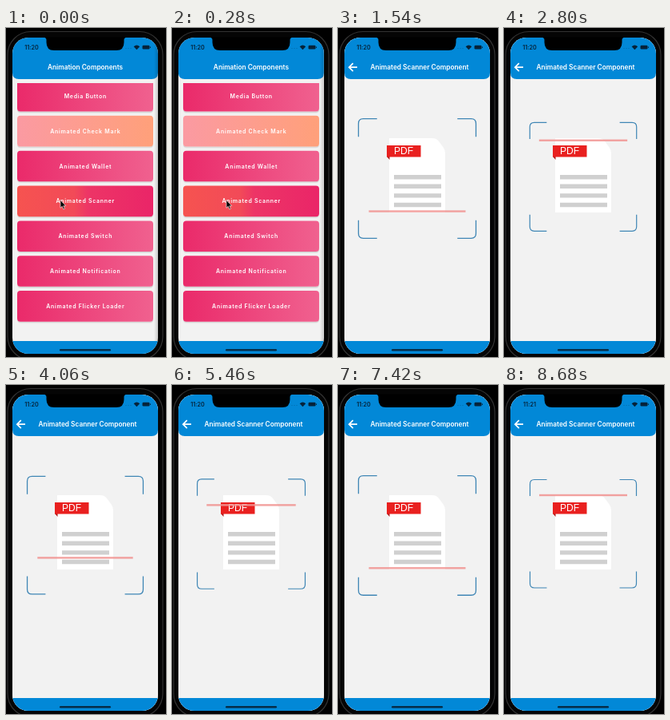
Animation of 200 by 412 pixels, one loop 8820 ms. Source, as an HTML page:

```html
<!DOCTYPE html>
<html lang="en">
<head>
<meta charset="utf-8">
<title>Animated Scanner Component</title>
<style>
  @property --scan { syntax: "<number>"; inherits: true; initial-value: 0; }
  @property --push { syntax: "<number>"; inherits: true; initial-value: 0; }

  html, body { margin: 0; width: 100%; height: 100%; overflow: hidden; background: #000; }

  #stage {
    --t: 0;
    display: block; width: 100%; height: 100%;
    font-family: Inter, "Liberation Sans", sans-serif; font-weight: 600;
    animation: scan 8820ms cubic-bezier(.455, .03, .515, .955) infinite paused,
               push 8820ms infinite paused,
               pointer 8820ms step-end infinite paused;
    animation-delay: calc(var(--t) * -1ms);
  }

  @keyframes scan {
    0%, 6.35% { --scan: 0; }
    17.86% { --scan: 1; }
    33.56% { --scan: 0; }
    50.79% { --scan: 1; }
    65.87% { --scan: 0; }
    83.33% { --scan: 1; }
    98.41%, 100% { --scan: 0; }
  }
  @keyframes push {
    0%, 3.17% { --push: 0; animation-timing-function: cubic-bezier(.3, .25, .7, .8); }
    6.35% { --push: .764; animation-timing-function: ease-out; }
    11.11%, 100% { --push: 1; }
  }
  @keyframes pointer {
    0% { --pointer: 1; }
    12.7%, 100% { --pointer: 0; }
  }

  .list { transform: translateX(calc(var(--push) * -54.6px)); }
  .page { transform: translateX(calc((1 - var(--push)) * 182px)); }
  .card { opacity: calc(1 - var(--push) * .26); }
  .tint { opacity: var(--push); }
  .dim { opacity: calc(var(--push) * .08); }
  .edge { opacity: calc((1 - var(--push)) * .5); }
  .cursor { opacity: var(--pointer); }
  .corners {
    transform-origin: 99px 186px;
    transform: translateY(calc(var(--scan) * 2.2px)) scale(calc(1 + var(--scan) * .105));
  }
  .beam {
    transform-origin: 99px 138px;
    transform: translateY(calc(var(--scan) * 92px)) scaleX(calc(1 + var(--scan) * .1));
  }
  .title { font-size: 8.3px; fill: #fff; text-anchor: middle; }
  .label { font-size: 7px; letter-spacing: .7px; fill: #fff; text-anchor: middle; }
</style>
</head>
<body>
<svg id="stage" viewBox="0 0 200 412">
  <defs>
    <clipPath id="screen"><rect x="8" y="12" width="182" height="396" rx="20"/></clipPath>
    <clipPath id="scroll"><rect x="8" y="69" width="182" height="323"/></clipPath>
    <linearGradient id="pink"><stop stop-color="#ea2a6a"/><stop offset="1" stop-color="#f0618f"/></linearGradient>
    <linearGradient id="peach"><stop stop-color="#fb9aa2"/><stop offset="1" stop-color="#ffa07a"/></linearGradient>
    <linearGradient id="pressed"><stop stop-color="#f65350"/><stop offset=".42" stop-color="#f24a58"/><stop offset=".52" stop-color="#ed3566"/><stop offset="1" stop-color="#ea2568"/></linearGradient>
    <linearGradient id="shade"><stop stop-color="#000" stop-opacity="0"/><stop offset="1" stop-color="#000" stop-opacity=".35"/></linearGradient>
    <path id="header" d="M8 10H190V56Q190 64 182 64H16Q8 64 8 56Z" fill="#0288d7"/>
    <path id="corner" d="M32.5 139V124Q32.5 118.5 38 118.5H53.5"/>
  </defs>

  <rect width="200" height="412" fill="#000"/>
  <rect x="2" y="4.5" width="194" height="411" rx="29" fill="#050505" stroke="#333" stroke-width="1.2"/>

  <g clip-path="url(#screen)">
    <rect x="8" y="10" width="182" height="400" fill="#f2f2f2"/>

    <g class="list">
      <use href="#header"/>
      <text class="title" x="99" y="52">Animation Components</text>
      <g clip-path="url(#scroll)" id="cards"></g>
    </g>
    <rect class="dim" x="8" y="10" width="182" height="400"/>

    <g class="page">
      <rect class="edge" x="3" y="10" width="5" height="400" fill="url(#shade)"/>
      <rect x="8" y="10" width="182" height="400" fill="#f2f2f2"/>
      <use href="#header"/>
      <path d="M24 49.2H14M18.8 44.2L13.8 49.2L18.8 54.2" fill="none" stroke="#fff" stroke-width="1.7"/>
      <text class="title" x="102" y="52">Animated Scanner Component</text>

      <path d="M64 138H118Q123 138 126 142L132 150Q134 153 134 157V231H64Z" fill="#fff"/>
      <path d="M61 161H64.5V165Z" fill="#b01515"/>
      <rect x="61" y="147" width="42.5" height="14.5" fill="#e9201f"/>
      <text x="82" y="158.4" font-family="Liberation Sans, Arial, sans-serif" font-weight="400" font-size="12" fill="#fff" text-anchor="middle">PDF</text>
      <path d="M70 186.7H129M70 198.3H129M70 209.9H129M70 221.5H129" stroke="#d0d0d0" stroke-width="5.4"/>

      <g class="corners" fill="none" stroke="#3f86b5" stroke-width="1.2">
        <use href="#corner"/>
        <use href="#corner" transform="matrix(-1 0 0 1 198 0)"/>
        <use href="#corner" transform="matrix(1 0 0 -1 0 372.5)"/>
        <use href="#corner" transform="matrix(-1 0 0 -1 198 372.5)"/>
      </g>
      <rect class="beam" x="44" y="136.8" width="110" height="2.4" fill="#f29693" opacity=".88"/>
    </g>

    <rect x="8" y="392" width="182" height="18" fill="#0288d7"/>
    <rect x="67" y="402" width="64" height="2.4" rx="1.2" fill="#062d48"/>

    <g fill="#06233a">
      <text id="clock" x="32" y="26.8" font-size="7.2" text-anchor="middle">11:20</text>
      <g opacity=".3"><circle cx="150" cy="25.5" r=".6"/><circle cx="153" cy="25.5" r=".6"/><circle cx="156" cy="25.5" r=".6"/></g>
      <path d="M159.6 23.2Q163.4 19.7 167.2 23.2L163.4 27.2Z"/>
      <rect x="170.5" y="21.8" width="9" height="4.8" rx="1.3"/>
      <rect x="180" y="23.3" width=".9" height="1.8" rx=".4"/>
    </g>
  </g>

  <path d="M47 11.5Q50.5 12 50.5 15V18Q50.5 28 60 28H138Q147.5 28 147.5 18V15Q147.5 12 151 11.5Z" fill="#000"/>
  <path class="cursor" d="M68 215.5V225.3L70.2 223.3L71.8 227L73.4 226.3L71.8 222.8H74.8Z" fill="#000" stroke="#fff" stroke-width=".6"/>
</svg>

<script>
  const LOOP = 8820, STEP = 140, CLOCK_TICK = 8260;
  const stage = document.getElementById("stage");
  const clock = document.getElementById("clock");

  const names = ["Media Button", "Animated Check Mark", "Animated Wallet", "Animated Scanner",
    "Animated Switch", "Animated Notification", "Animated Flicker Loader"];
  const fills = { 1: "peach", 3: "pressed" };
  const tints = { 1: "#ff8352", 3: "#e84e80" };

  const box = (y, attrs) => `<rect x="14" y="${y}" width="170" height="38.6" rx="4" ${attrs}/>`;

  document.getElementById("cards").innerHTML = names.map((name, i) => {
    const y = 66 + i * 43.85;
    return box(y + 1.8, 'fill="#000" opacity=".07"')
      + box(y + .8, 'fill="#000" opacity=".1"')
      + box(y, 'fill="#fff"')
      + box(y, `class="card" fill="url(#${fills[i] || "pink"})"`)
      + (tints[i] ? box(y, `class="tint" fill="${tints[i]}"`) : "")
      + `<text class="label" x="99.3" y="${y + 21.9}">${name}</text>`;
  }).join("");

  // The picture advances in even steps, like the recording rate of a screen capture.
  function draw() {
    const t = Math.floor((performance.now() % LOOP) / STEP) * STEP;
    stage.style.setProperty("--t", t);
    clock.textContent = t < CLOCK_TICK ? "11:20" : "11:21";
    requestAnimationFrame(draw);
  }
  draw();
</script>
</body>
</html>
```
